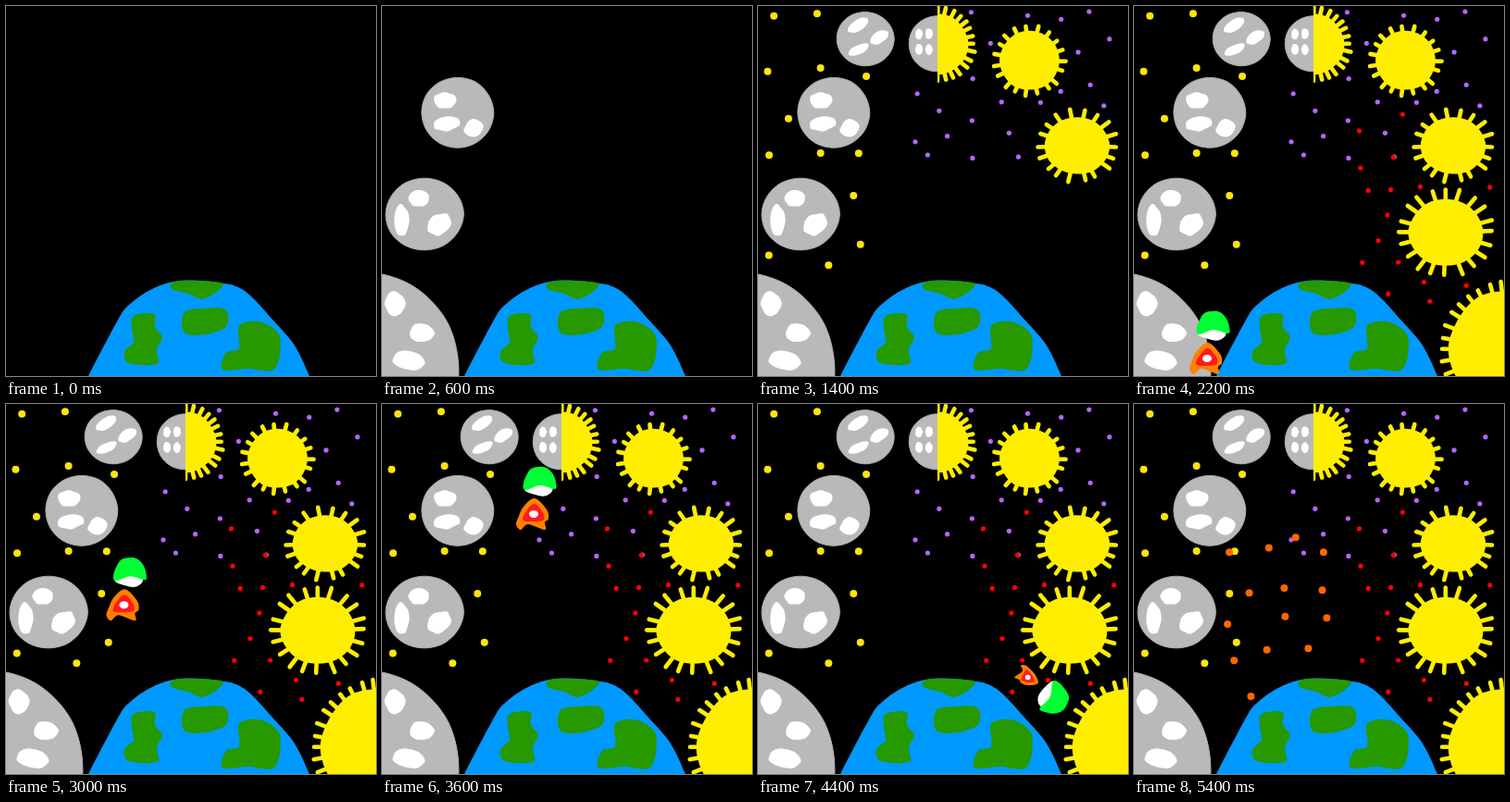
An HTML page for the animation above (5.6 s loop, 400 px wide and 400 px high).

```html
<!DOCTYPE html>
<html lang="en">
<head>
<meta charset="utf-8">
<title>Rocket trip</title>
<style>
  html, body { margin: 0; width: 100%; height: 100%; overflow: hidden; background: #000; }
  #stage { display: block; width: 100vw; height: 100vh; }
</style>
</head>
<body>
<svg id="stage" viewBox="0 0 400 400"></svg>
<script>
const LOOP = 5600;
const BLUE = '#0099ff', LAND = '#269900', GRAY = '#b9b9b9', SUN = '#ffee00';
const stage = document.getElementById('stage');

let seed = 7;
function random() {
  seed = (seed * 16807) % 2147483647;
  return seed / 2147483647;
}
const jitter = amount => (random() * 2 - 1) * amount;

function add(parent, tag, attrs = {}) {
  const el = document.createElementNS('http://www.w3.org/2000/svg', tag);
  for (const key in attrs) el.setAttribute(key, attrs[key]);
  return parent.appendChild(el);
}

const layers = [];
function layer(start) {
  const el = add(stage, 'g');
  layers.push({ el, start });
  return el;
}

// Closed smooth curve through the points
function curve(g, fill, p) {
  const n = p.length, at = i => p[(i + n) % n];
  let d = `M${p[0]}`;
  for (let i = 0; i < n; i++) {
    const [a, b, c, e] = [at(i - 1), at(i), at(i + 1), at(i + 2)];
    const c1 = b.map((v, k) => v + (c[k] - a[k]) / 6);
    const c2 = c.map((v, k) => v - (e[k] - b[k]) / 6);
    d += `C${c1} ${c2} ${c}`;
  }
  return add(g, 'path', { d: d + 'Z', fill });
}
const shape = (g, fill, text) => curve(g, fill, text.split(' ').map(pair => pair.split(',').map(Number)));

const onEllipse = (cx, cy, rx, ry, angle) => [cx + rx * Math.cos(angle), cy + ry * Math.sin(angle)];

// Hand-drawn looking ellipse
function blob(g, fill, [cx, cy, rx, ry, turn = 0], rough = 0.02) {
  const points = Array.from({ length: 12 }, (_, i) => {
    const k = 1 + jitter(rough);
    return onEllipse(cx, cy, rx * k, ry * k, i * Math.PI / 6);
  });
  const el = curve(g, fill, points);
  el.setAttribute('transform', `rotate(${turn} ${cx} ${cy})`);
  return el;
}

// Areas the stars keep clear of
const bodies = [[206, 450, 126, 154]];

function moon(g, disc, craters) {
  bodies.push(disc);
  const el = blob(g, GRAY, disc, 0.01);
  el.setAttribute('stroke', '#adadad');
  craters.forEach(c => blob(g, '#fff', c, 0.08));
}

function sun(g, [cx, cy, rx, ry], ray, count) {
  bodies.push([cx, cy, rx + ray, ry + ray]);
  let d = '';
  for (let i = 0; i < count; i++) {
    const angle = (i + jitter(0.15)) * 2 * Math.PI / count;
    const reach = ray - 2 + jitter(1.5);
    d += `M${cx},${cy}L${onEllipse(cx, cy, rx + reach, ry + reach, angle)}`;
  }
  add(g, 'path', { d, stroke: SUN, 'stroke-width': 4.6, 'stroke-linecap': 'round' });
  blob(g, SUN, [cx, cy, rx, ry]);
}

// Evenly scattered dots: each takes the roomiest of several free spots
function stars(g, fill, r, count, [x0, y0, x1, y1]) {
  const placed = [];
  const free = (x, y) => bodies.every(([cx, cy, rx, ry]) => Math.hypot((x - cx) / (rx + 6), (y - cy) / (ry + 6)) > 1);
  const room = (x, y) => Math.min(999, ...placed.map(([px, py]) => Math.hypot(px - x, py - y)));
  while (placed.length < count) {
    let best = null, most = -1;
    for (let tries = 0; tries < 40; tries++) {
      const x = x0 + random() * (x1 - x0), y = y0 + random() * (y1 - y0);
      if (free(x, y) && room(x, y) > most) {
        best = [x, y];
        most = room(x, y);
      }
    }
    if (!best) continue;
    placed.push(best);
    add(g, 'circle', { cx: best[0], cy: best[1], r, fill });
  }
}

// Earth
const earth = layer(0);
shape(earth, BLUE, '80,420 89,400 119,343 132,324 158,306 188,297 230,299 258,308 289,340 312,367 328,400 336,420');
shape(earth, LAND, '178,301 190,297 232,299 229,308 212,317 197,311 181,307');
shape(earth, LAND, '138,335 160,333 161,347 169,358 163,371 163,387 133,386 128,374 138,363 136,349');
shape(earth, LAND, '193,331 213,327 237,328 239,345 225,353 202,356 191,350');
shape(earth, LAND, '252,346 272,341 291,350 297,365 290,393 262,392 234,393 238,375 252,370');

// Moons
moon(layer(200), [-20, 395, 104, 107], [[14, 322, 11, 13], [43, 353, 13, 10], [29, 383, 18, 10, 10]]);
moon(layer(400), [46, 225, 42, 39], [[40, 208, 11, 9], [21, 232, 8, 17], [62, 236, 14, 11, -30]]);
moon(layer(600), [81.5, 115, 39, 38], [[68, 102, 12, 9], [70, 127, 14, 8, -8], [99, 132, 11, 9, -40]]);
const night = layer(1000);
moon(night, [116, 35.5, 31, 29], [[108, 21, 12, 6, -30], [131, 34, 11, 6, -35], [109, 47, 12, 5, -25]]);

// Half moon, half sun
const half = layer(1200);
const halfCraters = [174, 185].flatMap(x => [30, 47].map(y => [x, y, 4, 6]));
moon(half, [194, 41, 31, 30], halfCraters);
const rightSide = add(half, 'svg', { x: 194, width: 60, height: 90, viewBox: '194 0 60 90' });
sun(rightSide, [194, 41, 33, 33], 9, 28);

// Suns
const day = layer(1400);
sun(day, [293.5, 59, 32, 32], 8, 19);
sun(day, [345, 151, 35, 31], 10, 18);
const noon = layer(1800);
sun(noon, [337, 245, 40, 36], 13, 20);
sun(noon, [405, 371, 64, 64], 11, 34);

stars(night, '#ffe40a', 4, 13, [8, 8, 128, 286]);
stars(day, '#b566ff', 2.6, 22, [168, 6, 383, 165]);
stars(layer(2000), '#ff0000', 2.6, 16, [240, 112, 386, 326]);
stars(layer(5400), '#ff6600', 4, 14, [100, 143, 214, 318]);

// Rocket, nose up around its own centre
const rocket = add(stage, 'g');
const flame = add(rocket, 'g');
shape(flame, '#ff8000', '2,-17 15,-5 17,5 13,9 13,17 -5,11 -13,17 -18,11 -15,2 -10,-8');
shape(flame, '#ff1a1a', '1,-11 10,-3 12,6 2,8 -10,7 -9,0');
blob(flame, '#fff', [1, 0, 5, 4]);
shape(rocket, '#fff', '-11,-13 2,-16 16,-13 17,-7 11,-2 2,-2 -12,-7');
shape(rocket, '#00ff33', '-14,-16 -7,-30 2,-33 11,-32 18,-25 21,-16 20,-9 4,-13 -12,-8');

// Time, centre, turn
const flight = [
  [2000, 75, 385, 0], [2200, 82, 363, 0], [2400, 96, 347, 0], [3200, 142, 150, 0], [3600, 167, 101, 0],
  [3800, 246, 114, 115], [4000, 259, 160, 155], [4200, 259, 250, 165], [4400, 306, 307, 118], [4800, 380, 287, 75]
];

function pose(t) {
  const next = flight.findIndex(key => key[0] >= t);
  const b = flight[next], a = flight[Math.max(0, next - 1)];
  const k = b === a ? 0 : (t - a[0]) / (b[0] - a[0]);
  return a.map((v, i) => v + (b[i] - v) * k);
}

const show = (el, on) => el.setAttribute('visibility', on ? 'visible' : 'hidden');

function draw(t) {
  for (const { el, start } of layers) show(el, t >= start);
  const flying = t >= 2000 && t < 5200;
  show(rocket, flying);
  if (!flying) return;
  // The flight advances in jumps, slower ones at the end
  const hold = t < 4400 ? 200 : 400;
  const [, x, y, turn] = pose(Math.floor(t / hold) * hold);
  rocket.setAttribute('transform', `translate(${x} ${y}) rotate(${turn})`);
  flame.setAttribute('transform', `translate(-4 18) scale(${turn ? '0.55 0.75' : '1'})`);
}

const begin = performance.now();
function tick() {
  draw((performance.now() - begin) % LOOP);
  requestAnimationFrame(tick);
}
tick();
</script>
</body>
</html>
```
